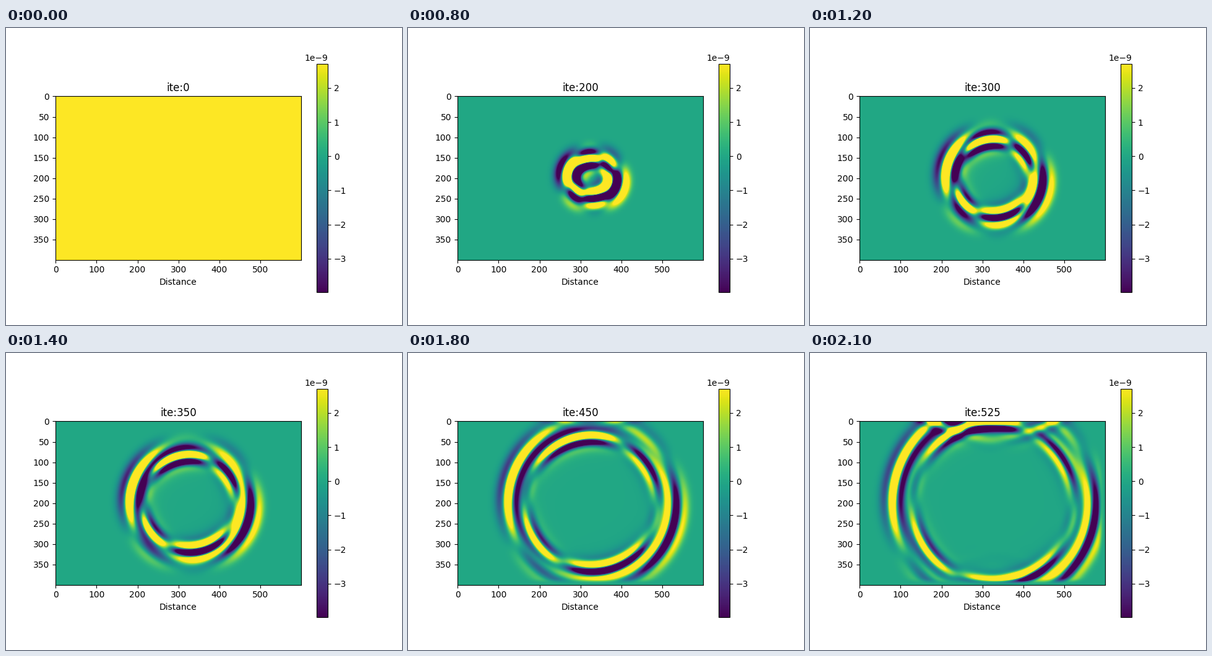
Write a matplotlib script that moves like this. It is 640 px wide and 480 px high and loops after 2200 ms.

```python
import numpy as np
import matplotlib.pyplot as plt
from matplotlib.animation import FuncAnimation

NZ, NX = 400, 600
STRIDE, FRAMES = 25, 22
VP2, VS2 = 0.574 ** 2, 0.466 ** 2      # squared speeds, cells per step
LAM = VP2 - 2 * VS2
SRC_Z, SRC_X = 200, 329
FREQ, DELAY = 0.01, 100                # Ricker wavelet, in steps
MXX, MZZ, MXZ = 450, -65, 355          # moment tensor
PAD, DAMP = 20, 0.345                  # absorbing border


def ricker(n):
    a = (np.pi * FREQ * (n - DELAY)) ** 2
    return (1 - 2 * a) * np.exp(-a)


def sponge():
    z, x = np.arange(NZ), np.arange(NX)
    dz = np.clip(z - (NZ - 1 - PAD), 0, PAD)
    dx = np.clip(PAD - np.minimum(x, NX - 1 - x), 0, PAD)
    d = (dz[:, None] / PAD) ** 2 + (dx[None, :] / PAD) ** 2
    return np.exp(-DAMP * d).astype(np.float32)


def simulate():
    """Elastic waves on a staggered grid with a free surface on top."""
    fields = [np.zeros((NZ, NX), np.float32) for _ in range(5)]
    vx, vz, sxx, szz, sxz = fields
    exx, ezz = np.zeros_like(vx), np.zeros_like(vx)
    fade = sponge()
    shots = []
    for n in range(STRIDE * (FRAMES - 1) + 1):
        vx[:, :-1] += sxx[:, 1:] - sxx[:, :-1]
        vx[1:] += sxz[1:] - sxz[:-1]
        vx[0] += 2 * sxz[0]
        vz[:-1] += szz[1:] - szz[:-1]
        vz[:, 1:] += sxz[:, 1:] - sxz[:, :-1]

        exx[:, 1:] = vx[:, 1:] - vx[:, :-1]
        ezz[1:] = vz[1:] - vz[:-1]
        ezz[0] = -LAM / VP2 * exx[0]
        sxx += VP2 * exx + LAM * ezz
        szz += VP2 * ezz + LAM * exx
        szz[0] = 0
        sxz[:-1] += VS2 * (vx[1:] - vx[:-1])
        sxz[:, :-1] += VS2 * (vz[:, 1:] - vz[:, :-1])

        w = ricker(n)
        sxx[SRC_Z, SRC_X] += MXX * w
        szz[SRC_Z, SRC_X] += MZZ * w
        sxz[SRC_Z, SRC_X - 1] += MXZ * w

        for f in fields:
            f *= fade
        if n % STRIDE == 0:
            shots.append(vx * 1e-9)
    return shots


shots = simulate()

fig, ax = plt.subplots(figsize=(6.4, 4.8), dpi=100)
im = ax.imshow(shots[0], cmap="viridis", vmin=-3.985e-9, vmax=2.71e-9)
fig.colorbar(im)
ax.set_xlabel("Distance")
title = ax.set_title("ite:0")


def update(k):
    im.set_data(shots[k])
    title.set_text(f"ite:{k * STRIDE}")
    return im, title


anim = FuncAnimation(fig, update, frames=FRAMES, interval=100, repeat=True)
plt.show()
```
